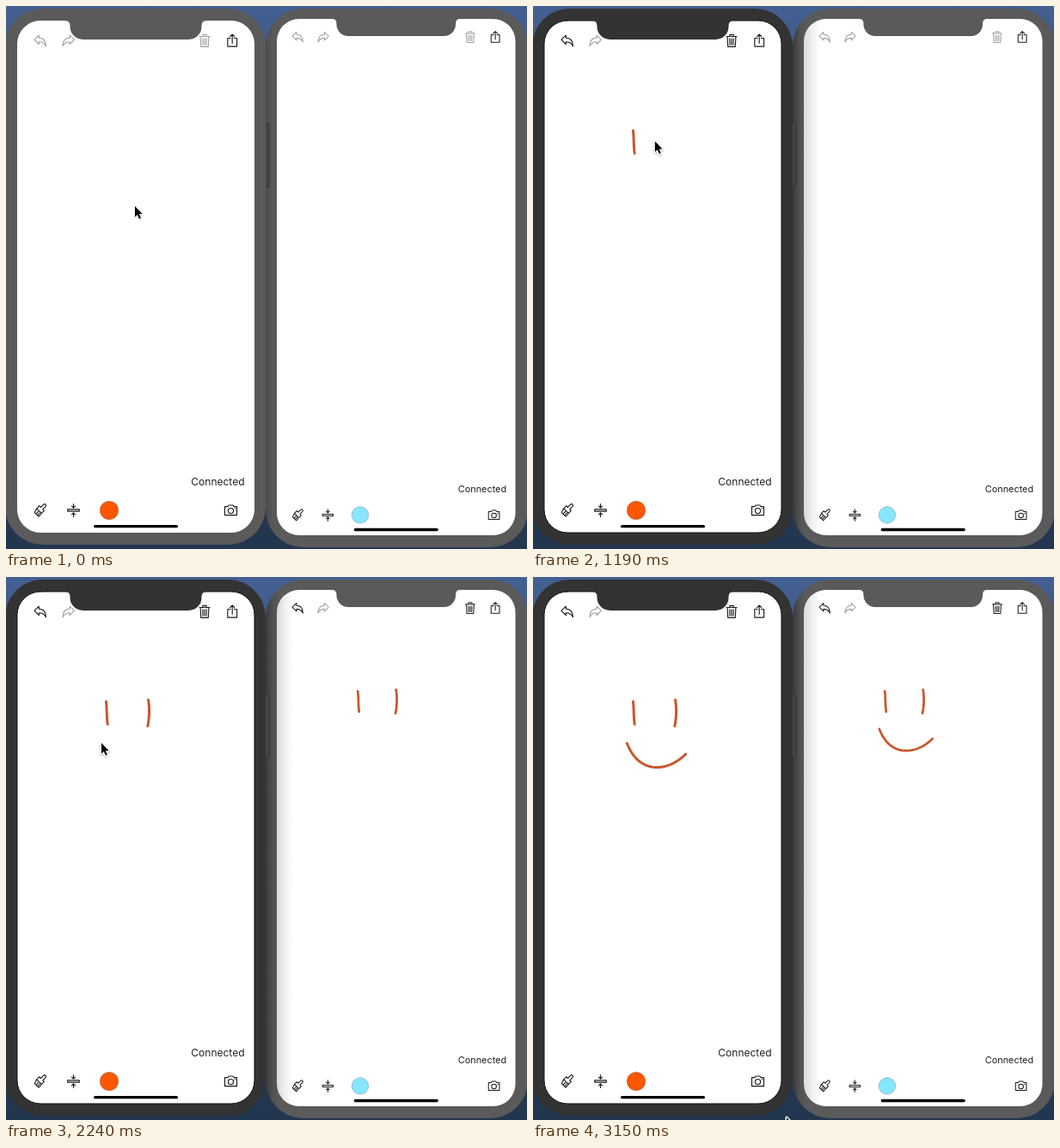
Recreate the animation shown at these times as an HTML page with a canvas. Size 606x632 px, loop 3.22 s.

```html
<!DOCTYPE html>
<html lang="en">
<head>
<meta charset="utf-8">
<title>Shared drawing</title>
<style>
  html, body { margin: 0; width: 606px; height: 632px; overflow: hidden; }
  canvas { display: block; }
</style>
</head>
<body>
<canvas id="stage" width="606" height="632"></canvas>
<script>
const ctx = document.getElementById('stage').getContext('2d');
const LOOP = 3220, STEP = 70, FOCUS = 770;
const DARK = '#1c1c1c', FADED = '#a2a2a2', GREY = '#5a5a5a';

const bend = 'M-6.8-1.2L-1.4-6.2V-3.2C3.6-3.2 6.6-.4 6.8 6.4C5 2.6 2.6 1.4-1.4 1.4V4.2Z';
const trash = 'M-6-4.8H6M-2.2-4.8V-7H2.2V-4.8M-4.9-4.8L-4.3 7H4.3L4.9-4.8M-2.2-2.4L-2 4.8M0-2.4V4.8M2.2-2.4L2 4.8';
const share = 'M-2.2-2.8H-5.4V6.8H5.4V-2.8H2.2M0 3V-7.2M-2.7-4.6L0-7.3L2.7-4.6';
const brush = 'M3.8-6.6Q5.2-8 6.4-6.8Q7.4-5.6 6-4.2L3-1.2L4.6.4L1.6 3.4L-4-2.2L-1-5.2L.8-3.6ZM-4-2.2L-6.4 2.6L-1.6 7.2L1.6 3.4M-4.6 4.2L-2.2 1.4M-3 5.8L-.6 3';
const space = 'M-6.8-1.1H6.8V1.1H-6.8ZM0-7.4V-3M-2-4.8L0-2.8L2-4.8M0 7.4V3M-2 4.8L0 2.8L2 4.8';
const camera = 'M-7-4.4H-3.6L-2.4-6H2.4L3.6-4.4H7V5.6H-7ZM3.1.6A3.1 3.1 0 1 1-3.1.6A3.1 3.1 0 1 1 3.1.6M4.7-2.2H5.3';

// Both phones share one layout, measured from the screen corners.
const left = { x: 13, y: 17, w: 276, h: 596, scale: 1, dot: '#ff5600' };
const right = { x: 315, y: 15, w: 277.5, h: 601, scale: .906, dot: '#86e6fd' };

// Each pen stroke is one cubic curve.
const strokes = [
  { curve: [[116.4, 145], [117.5, 153], [116.9, 163], [118.2, 171.4]], from: FOCUS, to: 1050, sent: 1330 },
  { curve: [[165.5, 143], [167, 152], [167, 163], [164.8, 173.5]], from: 1540, to: 1820, sent: 2030 },
  { curve: [[109.3, 193.5], [124.3, 232.5], [159.4, 225], [177.7, 206]], from: 2310, to: 2660, sent: 2800 }
];
const ENTER = [149.5, 233], EXIT = [294.5, 629], EXIT_TIME = 3150;

const sub = (v, a, b) => Math.min(1, Math.max(0, (v - a) / (b - a)));
const mix = (a, b, k) => a.map((v, i) => v + (b[i] - v) * k);

function onCurve(pts, k) {
  while (pts.length > 1) pts = pts.slice(1).map((p, i) => mix(pts[i], p, k));
  return pts[0];
}

// Follows the pen, and glides from one stroke to the next.
function pointer(t) {
  let time = 0, spot = ENTER;
  for (const { curve, from, to } of strokes) {
    if (t < from) return mix(spot, curve[0], 1 - (1 - sub(t, time, from)) ** 2);
    if (t <= to) return onCurve(curve, sub(t, from, to));
    time = to;
    spot = curve[3];
  }
  return mix(spot, EXIT, sub(t, time, EXIT_TIME) ** 3);
}

function box(x, y, w, h, r, fill, line) {
  ctx.beginPath();
  ctx.roundRect(x, y, w, h, r);
  ctx.fillStyle = fill;
  ctx.fill();
  if (line) {
    ctx.lineWidth = 1;
    ctx.strokeStyle = line;
    ctx.stroke();
  }
}

function fade(x0, y0, x1, y1, ...colors) {
  const g = ctx.createLinearGradient(x0, y0, x1, y1);
  colors.forEach((c, i) => g.addColorStop(i / (colors.length - 1), c));
  return g;
}

function within(x, y, scale, paint) {
  ctx.save();
  ctx.translate(x, y);
  ctx.scale(scale, scale);
  paint();
  ctx.restore();
}

function icon(path, x, y, color, flip = 1) {
  within(x, y, 1, () => {
    ctx.scale(flip, 1);
    ctx.lineWidth = 1.15;
    ctx.lineCap = ctx.lineJoin = 'round';
    ctx.strokeStyle = color;
    ctx.stroke(new Path2D(path));
  });
}

function notch(p, color) {
  within(p.x + p.w / 2, p.y, p.scale, () => {
    const half = 76.5, deep = 22, r = 15;
    ctx.beginPath();
    ctx.moveTo(-half - 6, -1);
    ctx.lineTo(-half - 6, 0);
    ctx.quadraticCurveTo(-half, 0, -half, 6);
    ctx.arcTo(-half, deep, 0, deep, r);
    ctx.arcTo(half, deep, half, 0, r);
    ctx.lineTo(half, 6);
    ctx.quadraticCurveTo(half, 0, half + 6, 0);
    ctx.lineTo(half + 6, -1);
    ctx.fillStyle = color;
    ctx.fill();
  });
}

function controls(p, active) {
  const on = active ? DARK : FADED, s = p.scale;
  const end = p.w / s, base = p.h / s;
  within(p.x, p.y, s, () => {
    icon(bend, 26.7, 23.3, on);
    icon(bend, 59.7, 23.3, FADED, -1);
    icon(trash, end - 58, 23.3, on);
    icon(share, end - 25.8, 23.3, DARK);
    icon(brush, 26.7, base - 26, DARK);
    icon(space, 65.5, base - 26, DARK);
    icon(camera, end - 27.5, base - 26, DARK);
    box(96.2, base - 36.8, 21.6, 21.6, 10.8, p.dot, 'rgba(130,130,140,.5)');
    ctx.font = '12px Inter, Roboto, sans-serif';
    ctx.textAlign = 'right';
    ctx.fillStyle = '#202020';
    ctx.fillText('Connected', end - 11.5, base - 55.4);
  });
  box(p.x + p.w / 2 - 49, p.y + p.h - 9 * s, 98, 3.3, 1.6, '#000');
}

function ink(curve, part) {
  ctx.beginPath();
  ctx.moveTo(...curve[0]);
  for (let i = 0; i <= 24; i++) ctx.lineTo(...onCurve(curve, part * i / 24 + 1e-4));
  ctx.lineWidth = 3;
  ctx.lineCap = ctx.lineJoin = 'round';
  ctx.strokeStyle = '#c9572f';
  ctx.stroke();
}

function arrow(x, y) {
  within(x + .5, y, .95, () => {
    const shape = new Path2D('M0 0V13.2L3 10.4L5.2 15.4L7.3 14.5L5.2 9.6H9.2Z');
    ctx.shadowColor = 'rgba(0,0,0,.3)';
    ctx.shadowBlur = 2;
    ctx.shadowOffsetY = 1;
    ctx.strokeStyle = '#fff';
    ctx.stroke(shape);
    ctx.shadowColor = 'transparent';
    ctx.fillStyle = '#000';
    ctx.fill(shape);
  });
}

function phones(focused) {
  const front = focused ? '#333' : GREY;
  const edge = focused ? ['#393939', '#515151'] : ['#4b4b4b', '#585858'];
  const shadow = focused ? ['#dadada', '#efefef', '#fff'] : ['#fff', '#fff'];

  box(302, 3, 305, 627, 44, fade(302, 0, 318, 0, ...edge, GREY));
  box(right.x, right.y, right.w, right.h, 26, fade(315, 0, 334, 0, ...shadow));
  notch(right, GREY);
  box(300, 136.5, 6, 74, 2, '#454545', '#323232');

  box(-1, 3, 303, 624, 44, front);
  box(left.x, left.y, left.w, left.h, 27, '#fff', focused && '#111');
  notch(left, front);
}

function draw(t) {
  ctx.fillStyle = fade(0, 0, 0, 632, '#436092', '#354052', '#22364f');
  ctx.fillRect(0, 0, 606, 632);
  phones(t >= FOCUS);
  controls(left, t >= strokes[0].to);
  controls(right, t >= strokes[0].sent);

  for (const { curve, from, to, sent } of strokes) {
    if (t > from) ink(curve, sub(t, from + STEP, to));
    if (t >= sent) within(303.7, 1.5, right.scale, () => ink(curve, 1));
  }

  const [x, y] = pointer(t);
  if (strokes.some(s => t >= s.from && t <= s.to)) {
    ctx.beginPath();
    ctx.arc(x, y + 1, 21.4, 0, 7);
    ctx.lineWidth = 1.6;
    ctx.strokeStyle = '#111';
    ctx.stroke();
  }
  arrow(x, y);
}

const start = performance.now();
function tick() {
  const t = (performance.now() - start) % LOOP;
  draw(Math.floor(t / STEP) * STEP);
  requestAnimationFrame(tick);
}
tick();
</script>
</body>
</html>
```
